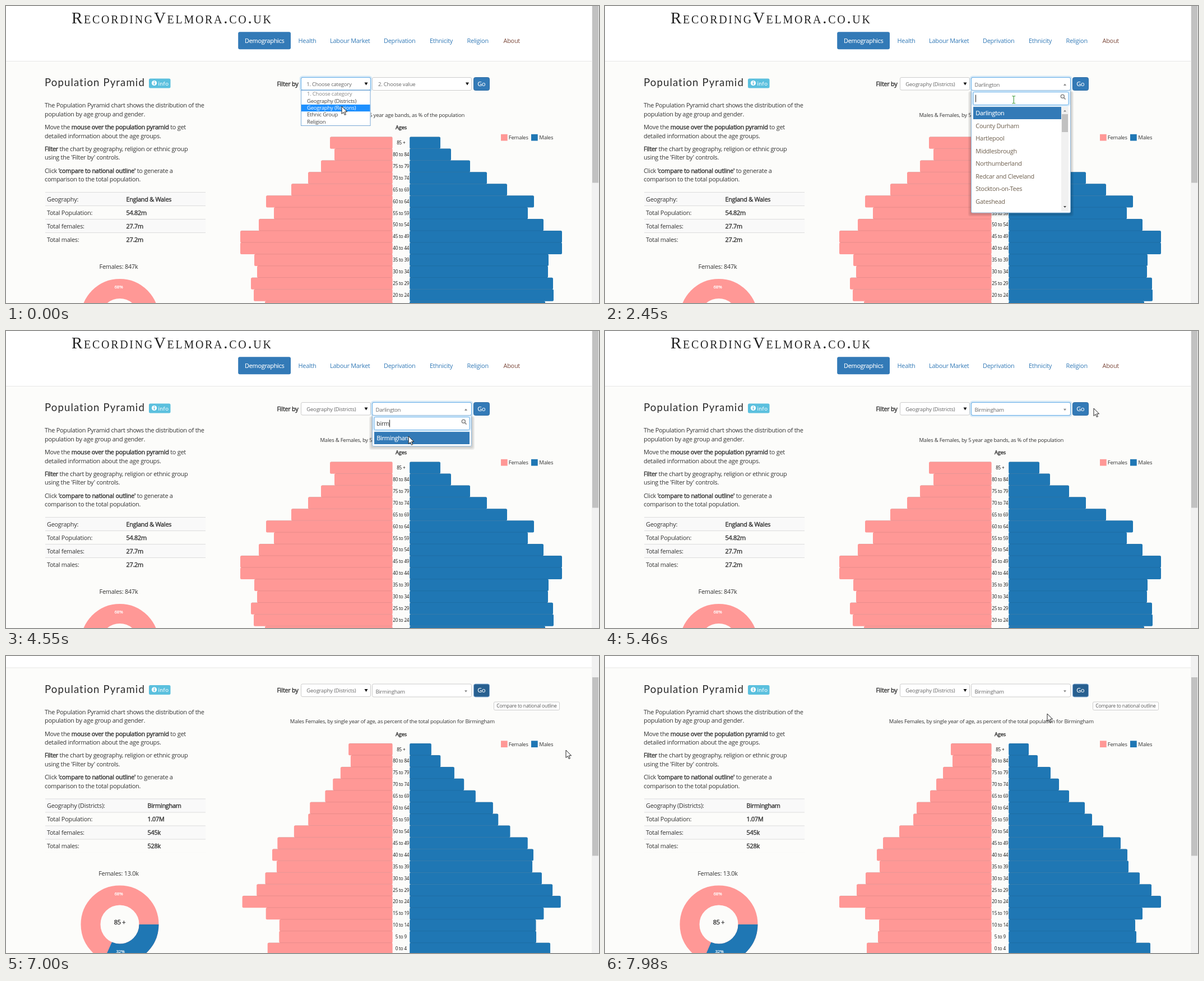
Recreate the animation shown at these times as an HTML page. Size 1058 by 530 pixels, loop 8000 ms.

```html
<!DOCTYPE html>
<html lang="en">
<head>
<meta charset="utf-8">
<title>Population Pyramid</title>
<style>
html, body { margin: 0; width: 100%; height: 100%; overflow: hidden; background: #fcfcfa; }
svg { display: block; width: 1058px; height: 530px; }
text { font: 10.9px "Open Sans", "Noto Sans", sans-serif; letter-spacing: -.023em; fill: #333; white-space: pre; }
.b { stroke: #333; stroke-width: .4px; }
.mid { text-anchor: middle; }
.white { fill: #fff; stroke: #fff; stroke-width: .15px; }
.nav { fill: #337ab7; }
.ctl { font-size: 9.5px; fill: #666; }
.small { font-size: 9.48px; }
.age { font-size: 8.1px; fill: #111; }
.pct { font-size: 8px; fill: #fff; stroke: #fff; stroke-width: .25px; }
.item { fill: #6e5f4e; }
.site { font: 29px "Liberation Serif", serif; font-variant: small-caps; letter-spacing: 2.7px; fill: #222; }
.head { font: 18.6px Lato, sans-serif; letter-spacing: 1.1px; fill: #2b2b2b; }
.tag { font: 10.2px Lato, sans-serif; letter-spacing: .4px; fill: #fff; }
</style>
</head>
<body>
<svg id="stage" viewBox="0 0 1058 530"></svg>
<script>
const PINK = '#ff9896', BLUE = '#1f77b4', PRIMARY = '#337ab7', DARK = '#286090';
const LOOP = 8000, STEP = 70, SCROLL = 77.5, ROW = 20.92, TOP = 233.6;
const LOADED = 6501, GROW = 750;

// Outer bar edges, oldest age band first
const national = {
  f: [578, 586, 562, 539, 509, 464, 478, 451, 418, 418, 443, 448, 437, 442, 462, 481, 489, 465],
  m: [775, 794, 828, 858, 894, 942, 931, 959, 992, 992, 968, 967, 976, 977, 962, 943, 935, 960]
};
const city = {
  f: [617, 620, 603, 591, 580, 556, 550, 525, 496, 485, 490, 465, 449, 418, 464, 489, 487, 467],
  m: [756, 772, 795, 810, 828, 856, 869, 889, 920, 932, 934, 954, 975, 992, 959, 946, 948, 973]
};
const pointerPath = [
  [0, 599, 179], [840, 599, 179], [980, 600, 167], [1190, 600, 167], [1680, 717, 141],
  [1960, 717, 141], [2520, 731, 171], [4270, 731, 171], [4620, 715, 192], [4690, 715, 192],
  [5110, 885, 148], [5180, 884, 147], [5460, 872, 138], [5600, 852, 138], [5740, 852, 138],
  [6370, 976, 160], [6650, 999, 168], [7420, 999, 168], [7980, 789, 103]
];
const northEast = ['Darlington', 'County Durham', 'Hartlepool', 'Middlesbrough', 'Northumberland',
  'Redcar and Cleveland', 'Stockton-on-Tees', 'Gateshead'];
const startB = ['Blackburn with Darwen', 'Blackpool', 'Barrow-in-Furness', 'Bolton', 'Bury',
  'Burnley', 'Barnsley', 'Bradford'];

const text = (x, y, s, cls = '', id = '') => `<text x="${x}" y="${y}" class="${cls}" id="${id}">${s}</text>`;
const rect = (x, y, w, h, fill, more = '') => `<rect x="${x}" y="${y}" width="${w}" height="${h}" fill="${fill}" ${more}/>`;
const bold = s => `<tspan class="b">${s}</tspan>`;
const triangle = (x, y, w, h, fill, id = '') =>
  `<path id="${id}" d="M${x - w / 2} ${y - h / 2}h${w}l${-w / 2} ${h}z" fill="${fill}"/>`;
const glow = (x, y, w, h, id) => `<g id="${id}" fill="none" stroke="#66afe9">
  ${rect(x - 1.5, y - 1.5, w + 3, h + 3, 'none', 'rx="4" stroke-width="3" opacity=".25"')}
  ${rect(x, y, w, h, 'none', 'rx="2.5"')}</g>`;

function header() {
  const links = [[521.5, 'Health'], [578, 'Labour Market'], [674, 'Deprivation'], [756, 'Ethnicity'], [822.5, 'Religion']];
  return rect(0, 0, 1045, 98, '#fff') + rect(0, 98, 1045, 1, '#e7e7e7') +
    text(117, 31, 'RecordingVelmora.co.uk', 'site') +
    rect(414.2, 46.3, 93.8, 31, PRIMARY, 'rx="3"') + text(426, 66, 'Demographics', 'white') +
    links.map(([x, s]) => text(x, 66, s, 'nav')).join('') +
    '<text x="887.5" y="66" style="fill:#7d4b3e">About</text>';
}

function sidebar() {
  const lines = [
    [181, 'The Population Pyramid chart shows the distribution of the'],
    [196.5, 'population by age group and gender.'],
    [220, `Move the ${bold('mouse over the population pyramid')} to get`],
    [235.5, 'detailed information about the age groups.'],
    [258.8, `${bold('Filter')} the chart by geography, religion or ethnic group`],
    [274, "using the 'Filter by' controls."],
    [297.5, `Click ${bold("'compare to national outline'")} to generate a`],
    [313, 'comparison to the total population.']
  ];
  const rows = ['Geography:', 'Total Population:', 'Total females:', 'Total males:'];
  return text(69, 143, 'Population Pyramid', 'head') +
    rect(255, 129.5, 38.5, 17, '#5bc0de', 'rx="2.5"') +
    '<circle cx="264.5" cy="137.5" r="4.6" fill="#fff"/>' +
    rect(263.7, 134.4, 1.7, 1.5, '#5bc0de') + rect(263.7, 136.8, 1.7, 3.6, '#5bc0de') +
    text(271.5, 141.5, 'info', 'tag') +
    lines.map(([y, s]) => text(69, y, s)).join('') +
    rows.map((s, i) => {
      const y = 332 + 24 * i;
      return rect(70, y, 286, 24, i % 2 ? '#fcfcfa' : '#f9f9f9') + rect(70, y, 286, 1, '#ddd') +
        text(73, y + 16.5, s, '', 'key' + i) + text(214.5, y + 16.5, '', 'b', 'val' + i);
    }).join('') +
    text(201, 469, '', 'mid', 'count') +
    `<g fill="none" stroke-width="35"><circle cx="203" cy="556.5" r="52" stroke="${PINK}"/>
     <circle id="share" cx="203" cy="556.5" r="52" stroke="${BLUE}" pathLength="1"/></g>` +
    text(201, 504.3, '68%', 'pct mid') + text(204, 607, '32%', 'pct mid') + text(203, 556.5, '85 +', 'b mid');
}

function chart() {
  let out = text(689.3, 197.5, '', 'small mid', 'caption') +
    '<text x="705" y="220" class="b mid" style="font-size:9.3px">Ages</text>' +
    rect(883, 228.8, 11.7, 11.7, PINK) + text(896.8, 238, 'Females', 'small') +
    rect(937, 228.8, 11.7, 11.7, BLUE) + text(951.3, 238, 'Males', 'small');
  for (let i = 0; i < 18; i++) {
    const y = TOP + i * ROW, low = 85 - 5 * i;
    out += rect(0, y, 0, ROW + .3, PINK, `id="f${i}" rx="2"`) +
      rect(720.2, y, 0, ROW + .3, BLUE, `id="m${i}" rx="2"`) +
      `<path id="seam${i}" stroke="#000" stroke-opacity=".09"/>` +
      text(704.8, y + 13.4, i ? `${low} to ${low + 4}` : '85 +', 'age mid');
  }
  return out;
}

function controls() {
  const options = ['1. Choose category', 'Geography (Districts)', 'Geography (Regions)', 'Ethnic Group', 'Religion'];
  let spokes = '';
  for (let i = 0; i < 12; i++)
    spokes += `<path id="spoke${i}" d="M4.6 0h3" transform="rotate(${i * 30})"/>`;
  return text(483.5, 142.8, bold('Filter by')) +
    rect(526.5, 127.5, 124, 22.5, '#fff', 'rx="2.5" stroke="#ccc"') + glow(526.5, 127.5, 124, 22.5, 'glow1') +
    text(536.3, 142.5, '', 'ctl', 'choice1') + triangle(642.5, 139, 6, 5, '#111') +
    rect(653.5, 127.5, 177, 23, '#fff', 'rx="2.5" stroke="#ccc"') + glow(653.5, 127.5, 177, 23, 'glow2') +
    text(664, 142.5, '', 'ctl', 'choice2') + triangle(823, 139, 6, 5, '#111', 'plainArrow') +
    triangle(820.5, 140.5, 5, 3.5, '#888', 'downArrow') +
    '<path id="upArrow" d="M818 142h5l-2.5-3.5z" fill="#888"/>' +
    rect(834.5, 127.5, 28, 23, PRIMARY, 'rx="3" id="go"') + text(848.3, 142.7, 'Go', 'white mid') +
    `<g id="spinner" transform="translate(893 138.7)" stroke="#222" stroke-width="1.9" stroke-linecap="round">${spokes}</g>` +
    '<g id="compare">' + rect(870.5, 159.5, 117, 14.5, '#fff', 'rx="2" stroke="#ccc"') +
    '<text x="929" y="169.8" class="mid" style="font-size:8.65px;fill:#555">Compare to national outline</text></g>' +
    '<g id="menu">' + rect(526.5, 150.5, 123.5, 63, '#fff', 'stroke="#7aa9d6"') +
    rect(527, 175.9, 122.5, 12.3, '#1e90ff', 'id="hover"') +
    options.map((s, i) => text(537, 160.2 + 12.4 * i, s, 'ctl', 'opt' + i)).join('') + '</g>';
}

function searchBox() {
  let items = '';
  for (let i = 0; i < 8; i++) items += text(661.3, 195 + 22.5 * i, '', i ? 'item' : 'white', 'item' + i);
  return '<g id="search">' +
    [5, 3.5, 2].map(d => rect(653 - d, 152, 178 + 2 * d, 0, '#000', `class="shade" data-d="${d}" rx="4" opacity=".06"`)).join('') +
    rect(653.5, 150.5, 177, 0, '#fff', 'id="panel" rx="2" stroke="#8fb6d8"') +
    rect(657, 153.5, 170, 23, '#fff') + glow(657, 153.5, 170, 23, 'glow3') +
    '<g fill="none" stroke="#888" stroke-width="1.5"><circle cx="816.3" cy="161.3" r="3"/><path d="M818.6 163.6l3 3"/></g>' +
    text(661, 169, '', '', 'query') + rect(661, 158.5, 1, 13, '#222', 'id="caret"') +
    rect(657, 180, 157, 22, PRIMARY, 'id="pick"') + items +
    '<g id="listBar">' + rect(814, 180, 13, 186, '#f1f1f1') + rect(815, 193, 11, 32, '#c1c1c1') +
    '<path d="M818 188.5h5l-2.5-3z" fill="#888"/>' + triangle(820.5, 358.5, 5, 3, '#444') + '</g></g>';
}

document.getElementById('stage').innerHTML =
  rect(0, 0, 1058, 530, '#fcfcfa') +
  `<g id="page">${header()}${sidebar()}${chart()}${controls()}${searchBox()}</g>` +
  rect(1045, 0, 13, 530, '#f1f1f1') + rect(1046, -3, 11, 318.5, '#c1c1c1', 'id="thumb"') +
  `<path id="arrow" d="M0 0V13.5L3.2 10.6 5.3 15.5 7.4 14.6 5.3 9.8H9.6Z" fill="#fff" stroke="#222" stroke-width="1"/>
   <path id="beam" d="M-3-6.5h2.2l.8.8.8-.8H3M0-5.7V5.7M-3 6.5h2.2l.8-.8.8.8H3" fill="none" stroke="#3d9a3d" stroke-width="1.1"/>`;

const ids = {};
document.querySelectorAll('[id]').forEach(e => { if (e.id) ids[e.id] = e; });
const shades = document.querySelectorAll('.shade');
const show = (id, on) => { ids[id].style.display = on ? '' : 'none'; };
const set = (id, name, value) => ids[id].setAttribute(name, value);
const write = (id, s) => { if (ids[id].textContent !== s) ids[id].textContent = s; };
const mix = (a, b, k) => a + (b - a) * k;
const cubic = p => p < .5 ? 4 * p ** 3 : 1 - 4 * (1 - p) ** 3;

function pointerAt(t) {
  const i = pointerPath.findIndex(k => k[0] > t);
  if (i < 0) return pointerPath[pointerPath.length - 1].slice(1);
  const [a, b] = [pointerPath[i - 1], pointerPath[i]];
  const k = (t - a[0]) / (b[0] - a[0]);
  return [mix(a[1], b[1], k), mix(a[2], b[2], k)];
}

function drawSelects(t) {
  const chosen = t >= 1260, ready = t >= 1400, open = t >= 1960 && t < 4690;
  show('menu', !chosen);
  const hover = t < 980 ? 2 : 1;
  set('hover', 'y', 151.1 + 12.4 * hover);
  for (let i = 0; i < 5; i++) ids['opt' + i].style.fill = i === hover ? '#fff' : i ? '#444' : '#888';
  write('choice1', chosen ? 'Geography (Districts)' : '1. Choose category');
  write('choice2', !ready ? '2. Choose value' : t < 4690 ? 'Darlington' : 'Birmingham');
  set('choice2', 'x', ready ? 659.5 : 664);
  set('choice2', 'y', ready ? 144 : 142.5);
  show('plainArrow', !ready);
  show('downArrow', ready && !open);
  show('upArrow', open);
  show('glow1', t < 1960);
  show('glow2', t >= 1960 && t < 5740);
  drawSearch(t, open);
}

function drawSearch(t, open) {
  show('search', open);
  if (!open) return;
  const list = t < 3640 ? northEast : t < 3710 ? startB : ['Birmingham'];
  const height = list.length > 1 ? 218.5 : 55;
  set('panel', 'height', height);
  shades.forEach(s => s.setAttribute('height', height + +s.dataset.d));
  for (let i = 0; i < 8; i++) write('item' + i, list[i] || '');
  show('listBar', list.length > 1);
  set('pick', 'width', list.length > 1 ? 157 : 170);
  write('query', t < 3500 ? '' : t < 3640 ? 'b' : t < 3710 ? 'bi' : t < 3780 ? 'bir' : 'birm');
  set('caret', 'x', 661 + ids.query.getComputedTextLength());
  show('caret', t < 2800 || t >= 3290);
}

function drawData(t) {
  const loaded = t >= LOADED;
  const k = cubic(Math.min(1, Math.max(0, (t - LOADED) / GROW)));
  for (let i = 0; i < 18; i++) {
    const left = mix(national.f[i], city.f[i], k), right = mix(national.m[i], city.m[i], k);
    set('f' + i, 'x', left);
    set('f' + i, 'width', 689.6 - left);
    set('m' + i, 'width', right - 720.2);
    set('seam' + i, 'd', `M${left + 2} ${TOP + i * ROW}H689M721 ${TOP + i * ROW}H${right - 2}`);
  }
  set('share', 'stroke-dasharray', mix(.328, .315, k) + ' 1');
  write('count', loaded ? 'Females: 13.0k' : 'Females: 847k');
  write('caption', loaded
    ? 'Males Females, by single year of age, as percent of the total population for Birmingham'
    : 'Males & Females, by 5 year age bands, as % of the population');
  write('key0', loaded ? 'Geography (Districts):' : 'Geography:');
  const values = loaded ? ['Birmingham', '1.07M', '545k', '528k'] : ['England & Wales', '54.82m', '27.7m', '27.2m'];
  values.forEach((s, i) => {
    write('val' + i, s);
    set('val' + i, 'x', loaded ? 252.5 : 214.5);
  });
  show('compare', loaded);
}

function drawStatus(t) {
  set('go', 'fill', t >= 5600 ? DARK : PRIMARY);
  set('go', 'stroke', t >= 5740 ? '#7fa9d4' : '#2e6da4');
  const busy = t >= 5740 && t < LOADED;
  show('spinner', busy);
  if (!busy) return;
  const lead = (t - 5740) / STEP + 5;
  for (let i = 0; i < 12; i++) {
    const age = (lead - i + 24) % 12;
    set('spoke' + i, 'opacity', Math.max(.12, 1 - age / 7));
  }
}

function draw(time) {
  const t = Math.floor(time / STEP) * STEP;
  const scrolled = t >= 6020;
  set('page', 'transform', `translate(0 ${scrolled ? -SCROLL : 0})`);
  set('thumb', 'y', scrolled ? 38 : -3);
  drawSelects(t);
  drawData(t);
  drawStatus(t);
  const [x, y] = pointerAt(t);
  const typing = t >= 1960 && t < 4690 && y > 156 && y < 177;
  show('arrow', !typing);
  show('beam', typing);
  set(typing ? 'beam' : 'arrow', 'transform', `translate(${x} ${y})`);
}

const start = performance.now();
function tick() {
  draw((performance.now() - start) % LOOP);
  requestAnimationFrame(tick);
}
tick();
</script>
</body>
</html>
```
